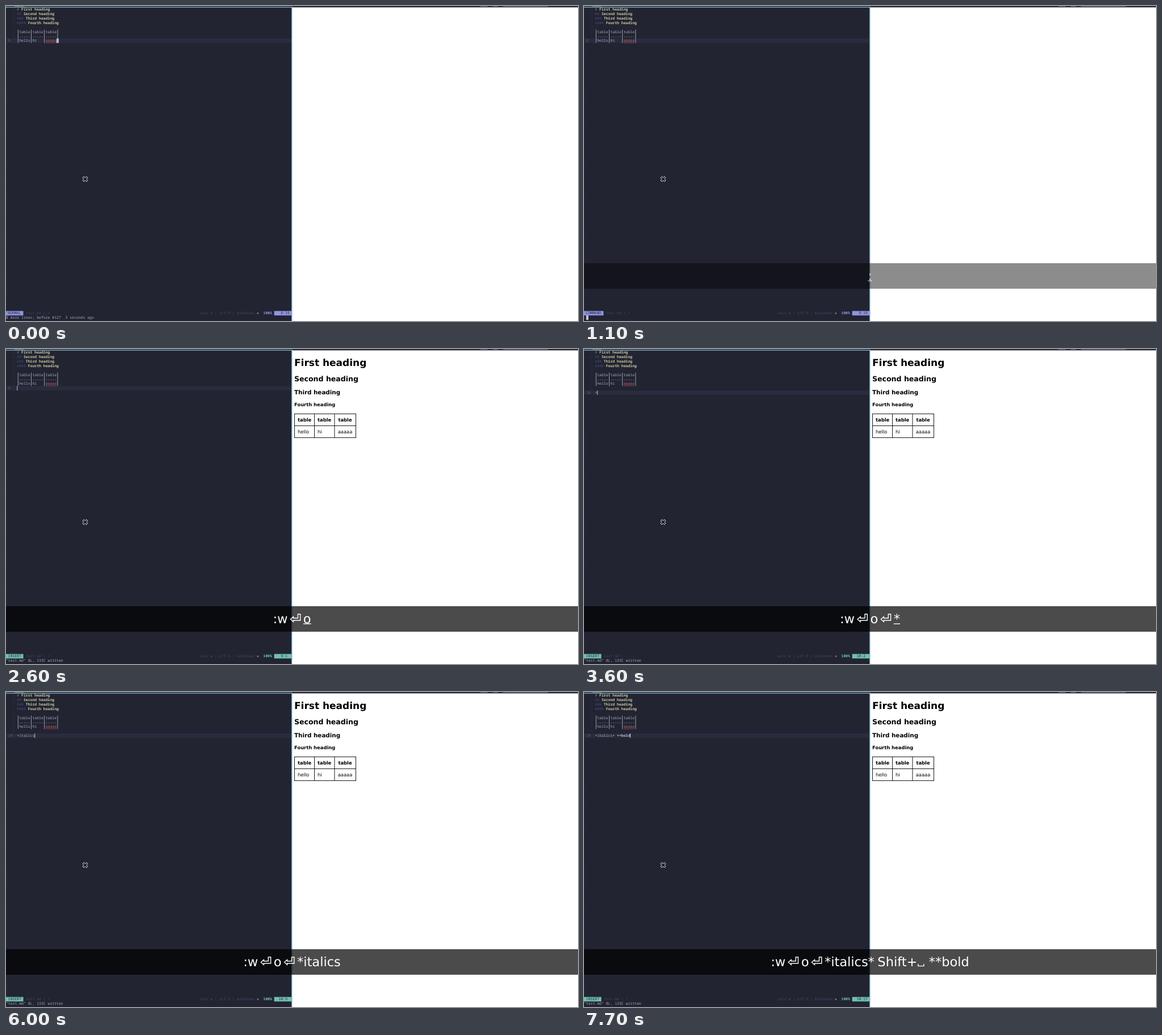
An HTML page with a canvas for the animation above (8000 ms loop, 1008 by 556 pixels).

```html
<!DOCTYPE html>
<html lang="en">
<head>
<meta charset="utf-8">
<title>Markdown live preview</title>
<style>
  html, body { margin: 0; width: 100%; height: 100%; overflow: hidden; background: #fff; }
  canvas { display: block; width: 1008px; height: 556px; }
</style>
</head>
<body>
<canvas id="stage"></canvas>
<script>
const W = 1008, H = 556, LOOP = 8000;
const CELL = 3.87, LINE = 7.884, TEXT_X = 5 * CELL;
const MONO = '"Noto Sans Mono", monospace', SANS = '"DejaVu Sans", sans-serif';
const BG = '#222432', FG = '#a6abc1', DIM = '#43465f', FAINT = '#35384d';
const MODE_COLOR = { NORMAL: '#8f95df', COMMAND: '#8f95df', INSERT: '#70c0ad' };

const canvas = document.getElementById('stage');
const ctx = canvas.getContext('2d');
const dpr = window.devicePixelRatio || 1;
canvas.width = W * dpr;
canvas.height = H * dpr;
ctx.scale(dpr, dpr);
ctx.textRendering = 'geometricPrecision';

// Key presses: time and the text shown so far (the caption of pressed keys).
const PREFIX = ':w⏎o⏎';
const keys = [[1100, ':'], [1200, ':w'], [1400, ':w⏎'], [2600, ':w⏎o'], [2800, PREFIX]];
const typing = [
  [3600, '*'], [3800, '*i'], [4100, '*it'], [4400, '*itc'], [4600, '*itca'],
  [4800, '*itc'], [4900, '*it'], [5000, '*ita'], [5200, '*ital'],
  [5600, '*itali'], [5800, '*italic'], [5900, '*italics'], [6600, '*italics*'],
  [6800, '*italics* '], [7000, '*italics* *'], [7100, '*italics* **'],
  [7200, '*italics* **b'], [7400, '*italics* **bo'],
  [7500, '*italics* **bol'], [7600, '*italics* **bold'],
];
for (const [time, line] of typing)
  keys.push([time, PREFIX + line.replace(' ', '\u2009Shift+␣')]);

const latest = (list, t) => list.findLastIndex(([time]) => time <= t);

function box(x, y, w, h, color) {
  ctx.fillStyle = color;
  ctx.fillRect(x, y, w, h);
}

function label(text, x, y, size, color, weight = 'normal') {
  ctx.font = `${weight} ${size}px ${SANS}`;
  ctx.fillStyle = color;
  ctx.fillText(text, x, y);
}

const rowTop = row => 2.2 + (row - 1) * LINE;

// Terminal text on the character grid.
function term(text, x, row, color = FG, weight = 'normal') {
  ctx.font = `${weight} 6.45px ${MONO}`;
  ctx.fillStyle = color;
  [...text].forEach((ch, i) =>
    ctx.fillText(ch, x + i * CELL, rowTop(row) + (ch === '*' ? 7.1 : 6.1)));
}

function frameAndBar() {
  box(0, 0, W, 2.4, '#272a39');
  for (const [x, w] of [[15, 16], [836, 13], [858, 9], [876, 79]]) box(x, 0, w, 1, '#777b8c');
  box(0, 1.5, 504.5, 1.4, '#78aabd');
  box(503, 1.5, 1.5, H, '#82b3c6');
}

function tableSource() {
  const put = (row, cells) => cells.forEach((s, i) => {
    const red = s === 'aaaaa';
    term(s, TEXT_X + (1 + 6 * i) * CELL, row, red ? '#d3666c' : FG);
    if (red) box(TEXT_X + 13 * CELL, rowTop(row) + 7.2, 5 * CELL, 0.7, '#b9585f');
  });
  put(6, ['table', 'table', 'table']);
  put(7, ['-----', '-----', '-----']);
  put(8, ['hello', 'hi', 'aaaaa']);
  for (let i = 0; i < 4; i++)
    box(TEXT_X + (6 * i + 0.5) * CELL - 0.5, rowTop(6), 1, 3 * LINE, '#9a9fb4');
}

function editor(t) {
  const line = typing[latest(typing, t)]?.[1] ?? '';
  const mode = t >= 2600 ? 'INSERT' : t >= 1000 && t < 1400 ? 'COMMAND' : 'NORMAL';
  const row = t >= 2800 ? 10 : t >= 2600 ? 9 : 8;
  const column = row === 8 ? 19 : line.length + 1;

  box(0, 0, 504, H, BG);
  box(0, rowTop(row), 503, LINE, '#2a2c3e');
  for (let r = 1; r <= 67; r++) {
    if (r === row) term(String(r), CELL, r, '#555b80');
    else if (r <= Math.max(8, row)) term(String(Math.abs(row - r)), 3 * CELL, r, '#2f3246');
    else term('~', 0, r, FAINT);
  }

  ['First', 'Second', 'Third', 'Fourth'].forEach((word, i) => {
    term('#'.repeat(i + 1), TEXT_X, i + 1, i ? '#444879' : '#77766f');
    term(word + ' heading', TEXT_X + (i + 2) * CELL, i + 1, '#c8c79f', 'bold');
  });
  if (mode === 'NORMAL') box(TEXT_X + 18 * CELL, rowTop(8), CELL, LINE, '#c6cadb');
  tableSource();

  term(line.slice(0, 10), TEXT_X, 10, line.length > 8 ? '#b6bbd3' : FG);
  term(line.slice(10), TEXT_X + 10 * CELL, 10, '#b6bbd3', 'bold');
  if (mode === 'INSERT')
    box(TEXT_X + (column - 1) * CELL, rowTop(row), 0.9, LINE, '#d2d5e2');

  statusLine(mode, row, column, t >= 1400 && t < 2600);
  if (mode === 'COMMAND') {
    term(t >= 1200 ? ':w' : ':', 0, 70);
    box((t >= 1200 ? 2 : 1) * CELL, rowTop(70), CELL, LINE, '#c6cadb');
  } else {
    term(t < 1000 ? '8 more lines; before #127  3 seconds ago' : '"test.md" 8L, 133C written', 0, 70);
  }
}

function statusLine(mode, row, column, saved) {
  const y = rowTop(69), color = MODE_COLOR[mode], ink = '#25283c';
  const width = (mode.length + 2) * CELL;
  box(0, y, mode === 'INSERT' ? 30.5 : width - 0.5, LINE, color);
  term(mode, mode === 'INSERT' ? CELL : CELL * 0.8, 69, ink);
  const nameX = (mode === 'COMMAND' ? 10 : 9) * CELL;
  term(saved ? 'test.md' : 'test.md | +', nameX, 69, DIM);
  term('unix ● | utf-8 | markdown', 341, 69, DIM);
  box(442.5, y + 2.8, 2.6, 2.6, '#73789c');
  term('100%', 453.3, 69, color, 'bold');
  box(472.6, y, 30.4, LINE, color);
  term(`${row}:${column}`, 472.6 + (row > 9 ? 2 : 3) * CELL, 69, ink);
}

function pointer() {
  const cross = (width, color, r) => {
    ctx.lineWidth = width;
    ctx.strokeStyle = color;
    ctx.beginPath();
    ctx.moveTo(139.5 - r, 305.5 - r); ctx.lineTo(139.5 + r, 305.5 + r);
    ctx.moveTo(139.5 + r, 305.5 - r); ctx.lineTo(139.5 - r, 305.5 + r);
    ctx.stroke();
  };
  cross(4, '#d5d6da', 3.6);
  cross(2.4, '#11121a', 3);
}

function preview() {
  label('First heading', 508, 29.5, 17, '#000', 'bold');
  label('Second heading', 508, 56.5, 12.55, '#000', 'bold');
  label('Third heading', 508, 80, 10.33, '#000', 'bold');
  label('Fourth heading', 508, 101, 8.38, '#000', 'bold');
  for (const x of [508, 543, 578.5, 616]) box(x, 114, 0.9, 43, '#000');
  for (const y of [114, 135, 156]) box(508, y, 108.9, 0.9, '#000');
  [[514, 'hello'], [549, 'hi'], [584.7, 'aaaaa']].forEach(([x, text], i) => {
    label('table', i === 2 ? 585.4 : x, 127.8, 8.38, '#000', 'bold');
    label(text, x, 148.8, 8.38, '#000');
  });
}

// Symbols in the key caption: advance width and outline.
const symbols = {
  '⏎': { advance: 27.5, closed: true, points: [[5, 9.5], [10, 5], [10, 7.5], [18, 7.5], [18, 0.5],
    [22.3, 0.5], [22.3, 11.5], [10, 11.5], [10, 14]], top: 467.5 },
  '␣': { advance: 20.4, points: [[1.5, 0], [1.5, 3.6], [11.5, 3.6], [11.5, 0]], top: 480 },
  '\u2009': { advance: 5.5 },
};

function drawSymbol({ points, closed, top }, x) {
  if (!points) return;
  ctx.beginPath();
  for (const [px, py] of points) ctx.lineTo(x + px, top + py);
  if (closed) ctx.closePath();
  ctx.lineWidth = 1.4;
  ctx.strokeStyle = '#fff';
  ctx.stroke();
}

function caption(t) {
  if (t < 1000) return;
  ctx.globalAlpha = t < 1100 ? 0.28 : t < 1200 ? 0.64 : 1;
  box(0, 454, W, 45, 'rgba(0,0,0,.706)');
  const index = latest(keys, t);
  if (index >= 0) {
    const [time, text] = keys[index];
    ctx.font = `22.5px ${SANS}`;
    const widthOf = s => symbols[s]?.advance ?? ctx.measureText(s).width;
    const parts = text.split(/([⏎␣\u2009])/).filter(Boolean);
    let x = 504 - parts.reduce((sum, s) => sum + widthOf(s), 0) / 2;
    for (const s of parts) {
      if (symbols[s]) drawSymbol(symbols[s], x);
      else label(s, x, 483.7, 22.5, '#fff');
      x += widthOf(s);
    }
    const added = text.length > (keys[index - 1]?.[1].length ?? 0);
    if (added && t < time + 100) {
      const w = widthOf(text.at(-1));
      box(x - w, 484.4, w, 1.4, '#fff');
    }
  }
  ctx.globalAlpha = 1;
}

function draw(now) {
  const t = now % LOOP;
  box(0, 0, W, H, '#fff');
  editor(t);
  if (t >= 1600) preview();
  frameAndBar();
  pointer();
  caption(t);
  requestAnimationFrame(draw);
}
requestAnimationFrame(draw);
</script>
</body>
</html>
```
